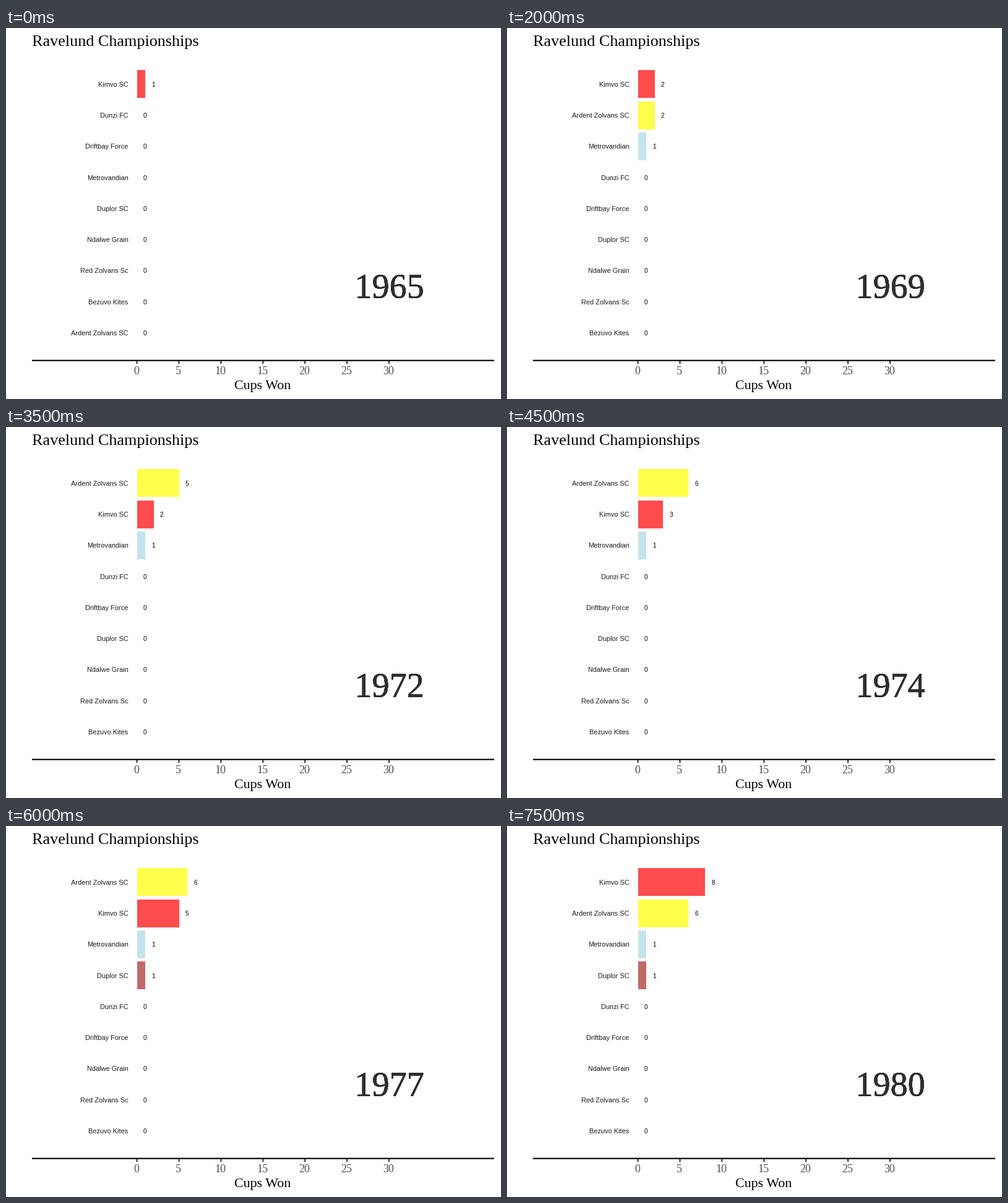
A matplotlib script for the animation above (8 s loop, 800 by 600 pixels).

```python
import matplotlib.pyplot as plt
from matplotlib.animation import FuncAnimation
from matplotlib.patches import Rectangle
from matplotlib.patheffects import Normal

W, H, DPI = 800, 600, 100
SANS, SERIF = "Liberation Sans", "Liberation Serif"
X0, UNIT = 211.6, 13.58          # position of zero, pixels per cup
ROW = 50.25
FIRST_YEAR = 1965

# Listed in tie-break order
CLUBS = ["Dunzi FC", "Driftbay Force", "Metrovandian", "Duplor SC",
         "Ndalwe Grain", "Red Zolvans Sc", "Kimvo SC", "Bezuvo Kites",
         "Ardent Zolvans SC"]
COLORS = {"K": "red", "A": "yellow", "M": "lightblue", "D": "brown"}
KEYS = {"K": "Kimvo SC", "A": "Ardent Zolvans SC",
        "M": "Metrovandian", "D": "Duplor SC"}
FILL = {KEYS[k]: c for k, c in COLORS.items()}
WINNERS = [KEYS[k] for k in "KKMAAAAAKADKKKKK"]   # one champion per year

fig = plt.figure(figsize=(W / DPI, H / DPI), dpi=DPI, facecolor="white")
ax = fig.add_axes([0, 0, 1, 1])
ax.set_xlim(0, W)
ax.set_ylim(H, 0)
ax.axis("off")


def write(x, y, s, size, font=SANS, color="black", ha="left", **kw):
    return ax.text(x, y, s, fontsize=size * 72 / DPI, family=font,
                   color=color, ha=ha, va="baseline", **kw)


def line(xs, ys, color, width):
    ax.plot(xs, ys, color=color, lw=width * 72 / DPI,
            solid_capstyle="butt", snap=False)


# Title and axis
write(42, 29, "Ravelund Championships", 26.15, SERIF)
write(414.2, 584, "Cups Won", 22, SERIF, ha="center")
for cups in range(0, 31, 5):
    x = X0 + cups * UNIT
    line([x, x], [538, 543.3], "#333333", 2.1)
    label = str(cups)
    write(x - 0.8 - 4.5 * len(label), 560, label, 18, SERIF, "#4d4d4d")
line([42, 789], [537.7, 537.7], "black", 2.13)

# One bar, name and value per row
bars, names, values = [], [], []
for i in range(len(CLUBS)):
    bar = Rectangle((round(X0), round(68.4 + 50.2 * i)), 0, 45, lw=0, alpha=0.7)
    bars.append(ax.add_patch(bar))
    base = round(94.9 + ROW * i)
    names.append(write(197.5, base, "", 11, color="#1a1a1a", ha="right"))
    values.append(write(X0, base, "", 10))

# The year is printed once per club, which hardens its edges
year = write(563.4, 436.4, "", 56.2, SERIF, "#2e2e2e",
             path_effects=[Normal()] * len(CLUBS))


def update(i):
    won = WINNERS[:i + 1]
    ranked = sorted(CLUBS, key=lambda c: -won.count(c))
    for club, bar, name, value in zip(ranked, bars, names, values):
        cups = won.count(club)
        end = X0 + cups * UNIT
        bar.set_width(round(end) - round(X0))
        bar.set_facecolor(FILL.get(club, "white"))
        bar.set_visible(cups > 0)
        name.set_text(club)
        value.set_text(str(cups))
        value.set_x(end + 9.95)
    year.set_text(str(FIRST_YEAR + i))
    return [*bars, *names, *values, year]


anim = FuncAnimation(fig, update, frames=len(WINNERS), interval=500, repeat=True)
plt.show()
```
